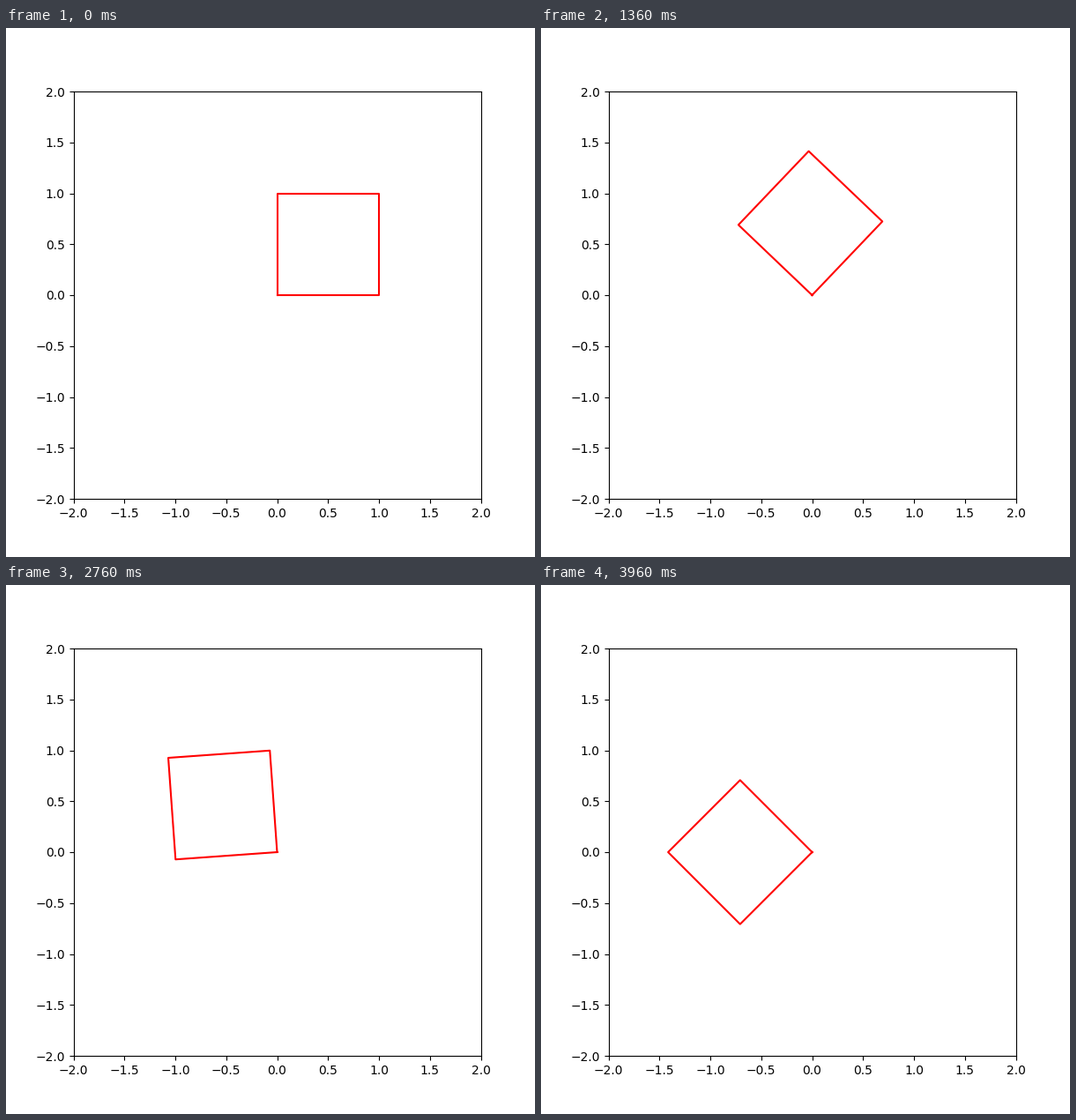
Write a matplotlib script that moves like this. It is 600 by 600 pixels and loops after 4000 ms.

```python
import numpy as np
import matplotlib.pyplot as plt
from matplotlib.animation import FuncAnimation

FRAMES = 100
INTERVAL = 40
END_ANGLE = 3 * np.pi / 4

SQUARE = np.array([[0, 1, 1, 0, 0],
                   [0, 0, 1, 1, 0]], dtype=float)


def rotated(points, angle):
    c, s = np.cos(angle), np.sin(angle)
    return np.array([[c, -s], [s, c]]) @ points


fig, ax = plt.subplots(figsize=(6, 6), dpi=100)
ax.set_xlim(-2, 2)
ax.set_ylim(-2, 2)
ax.set_aspect("equal")
line, = ax.plot(*SQUARE, color="red", lw=1.5)


def update(frame):
    angle = END_ANGLE * frame / (FRAMES - 1)
    line.set_data(*rotated(SQUARE, angle))
    return line,


anim = FuncAnimation(fig, update, frames=FRAMES, interval=INTERVAL,
                     repeat=True, repeat_delay=0)
plt.show()
```
